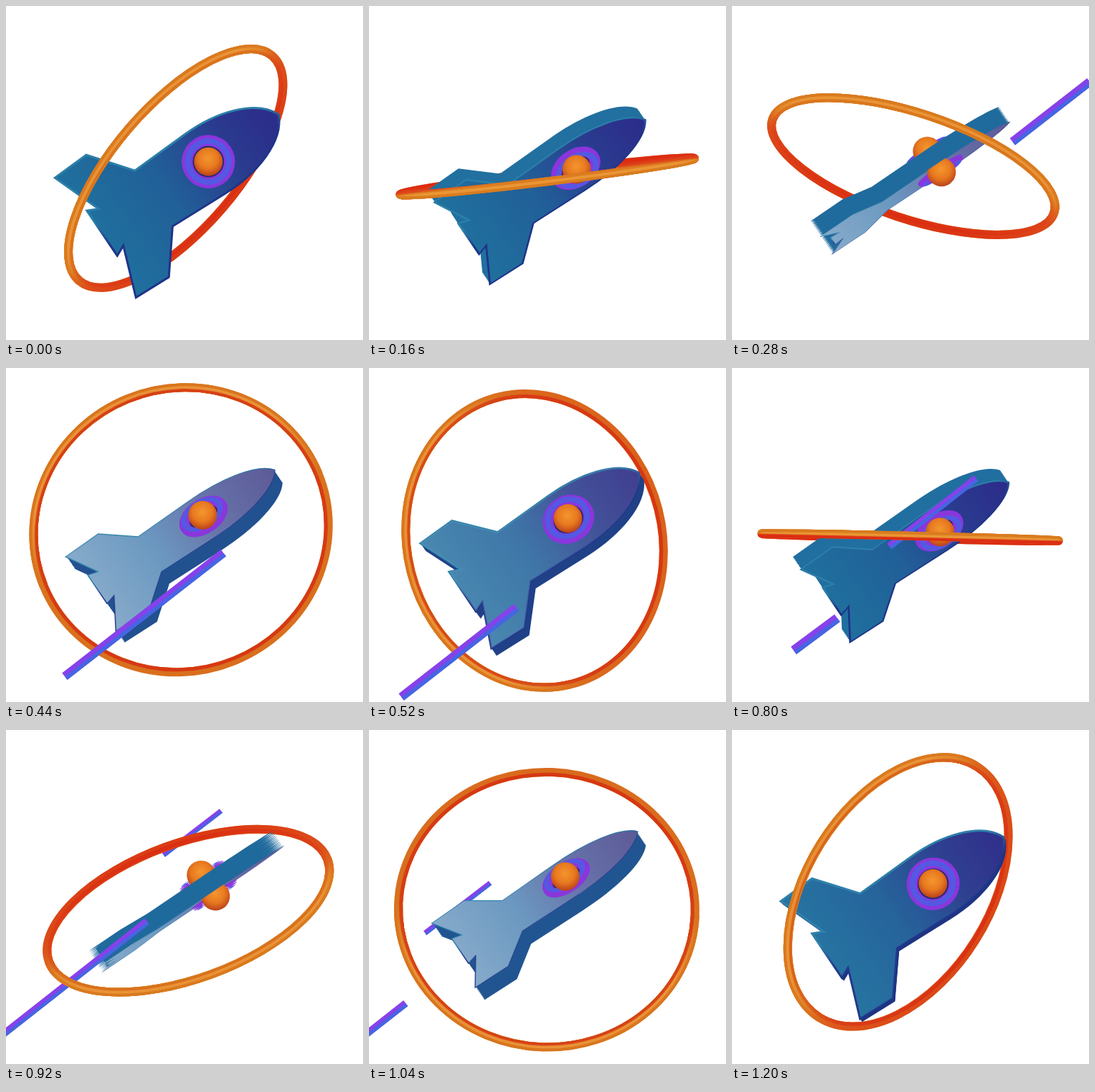
Animation, 498 px wide and 467 px high, one loop 1240 ms. Source, as an HTML page without scripts:

```html
<!DOCTYPE html>
<html lang="en">
<head>
<meta charset="utf-8">
<title>Spinning rocket</title>
<style>
@property --turn { syntax: '<angle>'; inherits: true; initial-value: 0deg; }
@property --roll { syntax: '<angle>'; inherits: true; initial-value: 0deg; }

html, body { margin: 0; width: 100%; height: 100%; overflow: hidden; background: #fff; }
svg { display: block; width: 498px; height: 467px; }

/* The ring tumbles about two axes; its matrix is the flat projection of both turns. */
.ring {
  --q: calc(var(--turn) + 58.7deg);
  --r: calc(var(--turn) + 36deg);
  --nx: calc(cos(var(--r)) * sin(var(--q)));
  --ny: calc(sin(var(--r)));
  --nz: calc(cos(var(--r)) * cos(var(--q)));
  animation: tumble 1240ms linear infinite;
  transform:
    translate(calc(248.5px - 41px * var(--nx) * var(--nz)), calc(237px - 41px * var(--ny) * var(--nz)))
    matrix(calc(cos(var(--q))), 0, calc(-1 * sin(var(--r)) * sin(var(--q))), calc(cos(var(--r))), 0, 0)
    rotate(atan2(calc(-1 * sin(var(--r)) * cos(var(--q))), calc(-1 * sin(var(--q)))));
  fill: none;
}
.ring path, .ring circle { vector-effect: non-scaling-stroke; }
.outer { stroke: #d9761f; stroke-width: 12px; }
.inner { stroke: #d63a14; stroke-width: 5px; }
.tint { stroke: url(#tube); stroke-width: 12px; opacity: calc(1 - var(--nz) * var(--nz)); }
.shine { stroke: url(#gloss); stroke-width: 4px; }
@keyframes tumble { to { --turn: 360deg; } }

/* Both sides of the rocket look alike, so half a turn repeats. */
.rocket { animation: roll 620ms -310ms linear infinite; }
@keyframes roll { from { --roll: -90deg; } to { --roll: 90deg; } }
.layer { transform: matrix(1, 0, 0, calc(cos(var(--roll))), 0, calc(sin(var(--roll)) * var(--w) * var(--side, 1))); }
.ball { transform: translateY(calc(sin(var(--roll)) * 18px * var(--side))); }
.visible { transform: translateY(calc(sin(var(--roll)) * (113px - 50px * cos(var(--roll))))); }
.edge { animation: edge 620ms -310ms linear infinite; }
.sheen { animation: sheen 620ms -310ms linear infinite; }
@keyframes edge {
  0%, 100% { fill: #1f6a9c; }
  22% { fill: #22508f; }
  49% { fill: #1d2f80; }
  50% { fill: #2577a5; }
}
@keyframes sheen {
  0%, 22%, 95%, 100% { opacity: 1; }
  40% { opacity: .1; }
  50%, 80% { opacity: 0; }
}

/* Beams: dash pattern is "0, tail, length, rest". */
.beam { fill: none; stroke: #8642ea; stroke-width: var(--size); animation: 1240ms linear infinite; }
.beam path + path { stroke: #4466e2; stroke-width: calc(var(--size) * .45); transform: translate(calc(var(--size) * .16), calc(var(--size) * .22)); }
.long { --size: 12px; animation-name: long; }
.low { --size: 13px; animation-name: low; }
.mid { --size: 10px; animation-name: mid; }
.far { --size: 7px; animation-name: far; }
@keyframes long {
  0%, 18% { stroke-dasharray: 0 0 0 999; }
  22.6% { stroke-dasharray: 0 0 136 999; }
  37.1% { stroke-dasharray: 0 279 298 999; }
  52.6%, 100% { stroke-dasharray: 0 577 0 999; }
}
@keyframes low {
  0%, 52.6% { stroke-dasharray: 0 0 0 999; }
  56.8% { stroke-dasharray: 0 0 120 999; }
  60.5% { stroke-dasharray: 0 78 158 999; }
  68.4%, 100% { stroke-dasharray: 0 236 0 999; }
}
@keyframes mid {
  0%, 59.4% { stroke-dasharray: 0 0 0 999; }
  64.5% { stroke-dasharray: 0 0 153 999; }
  74.8% { stroke-dasharray: 0 195 266 999; }
  88.7%, 100% { stroke-dasharray: 0 461 0 999; }
}
@keyframes far {
  0%, 71% { stroke-dasharray: 0 0 0 999; }
  75.3% { stroke-dasharray: 0 0 133 999; }
  80.3% { stroke-dasharray: 0 96 184 999; }
  90%, 100% { stroke-dasharray: 0 280 0 999; }
}
</style>
</head>
<body>
<svg viewBox="0 0 498 467">
  <defs>
    <linearGradient id="tube" gradientUnits="userSpaceOnUse" x1="-207" y1="0" x2="207" y2="0">
      <stop offset="0" stop-color="#dc2c12"/>
      <stop offset=".4" stop-color="#de451a"/>
      <stop offset=".62" stop-color="#dc7d20"/>
      <stop offset="1" stop-color="#d97c1e"/>
    </linearGradient>
    <linearGradient id="gloss" gradientUnits="userSpaceOnUse" x1="-207" y1="0" x2="207" y2="0">
      <stop offset=".5" stop-color="#f0a040" stop-opacity="0"/>
      <stop offset=".75" stop-color="#f0a040" stop-opacity=".7"/>
    </linearGradient>
    <linearGradient id="paint" gradientUnits="userSpaceOnUse" x1="-95" y1="0" x2="205" y2="0">
      <stop offset="0" stop-color="#1f709e"/>
      <stop offset=".4" stop-color="#215f98"/>
      <stop offset=".75" stop-color="#2a3a8e"/>
      <stop offset="1" stop-color="#2c2c8a"/>
    </linearGradient>
    <linearGradient id="rim" gradientUnits="userSpaceOnUse" x1="0" y1="-50" x2="0" y2="50">
      <stop offset=".3" stop-color="#2b7fa9"/>
      <stop offset=".7" stop-color="#1e3488"/>
    </linearGradient>
    <linearGradient id="pale" gradientUnits="userSpaceOnUse" x1="-95" y1="0" x2="205" y2="0">
      <stop offset="0" stop-color="#86aaca"/>
      <stop offset=".35" stop-color="#6b98c0"/>
      <stop offset=".65" stop-color="#6874aa"/>
      <stop offset="1" stop-color="#5c5b98"/>
    </linearGradient>
    <radialGradient id="orb" cx=".55" cy=".4" r=".62">
      <stop offset="0" stop-color="#f3962f"/>
      <stop offset=".55" stop-color="#e8791f"/>
      <stop offset="1" stop-color="#b8401c"/>
    </radialGradient>
    <path id="hull" d="M0-47L86-50C140-52 195-35 210 0C195 35 140 52 86 50L0 47L-44 103L-98 101L-72 31L-87 38V-38L-72-31L-98-101L-44-103Z"/>
    <g id="porthole">
      <circle class="layer" style="--w:14" r="24" fill="#232a72"/>
      <g fill="none" stroke="#8a36dc">
        <circle class="layer" style="--w:14" r="29.5" stroke-width="15"/>
        <circle class="layer" style="--w:16" r="29.5" stroke-width="15"/>
        <circle class="layer" style="--w:18" r="29.5" stroke-width="13"/>
        <circle class="layer" style="--w:20" r="28.5" stroke-width="8" stroke="#5458e2"/>
      </g>
      <circle class="ball" r="20" fill="url(#orb)"/>
    </g>
  </defs>

  <g class="beam far"><path d="M300 113L78 284"/><path d="M300 113L78 284"/></g>

  <g class="ring">
    <circle class="outer" r="207"/>
    <circle class="inner" r="203.5"/>
    <circle class="tint" r="207"/>
    <circle class="shine" r="207"/>
  </g>

  <g class="rocket">
    <g transform="translate(206 269) rotate(-34)">
      <clipPath id="facing"><rect class="visible" x="-100" y="-100" width="200" height="200"/></clipPath>
      <use href="#porthole" x="92" style="--side:-1"/>
      <g class="edge">
        <use href="#hull" class="layer" style="--w:-13"/>
        <use href="#hull" class="layer" style="--w:-11"/>
        <use href="#hull" class="layer" style="--w:-9"/>
        <use href="#hull" class="layer" style="--w:-7"/>
        <use href="#hull" class="layer" style="--w:-5"/>
        <use href="#hull" class="layer" style="--w:-3"/>
        <use href="#hull" class="layer" style="--w:-1"/>
        <use href="#hull" class="layer" style="--w:1"/>
        <use href="#hull" class="layer" style="--w:3"/>
        <use href="#hull" class="layer" style="--w:5"/>
        <use href="#hull" class="layer" style="--w:7"/>
        <use href="#hull" class="layer" style="--w:9"/>
        <use href="#hull" class="layer" style="--w:11"/>
      </g>
      <g class="layer" style="--w:13">
        <use href="#hull" fill="url(#paint)" stroke="url(#rim)" stroke-width="3"/>
        <use href="#hull" class="sheen" fill="url(#pale)"/>
      </g>
      <g transform="translate(92 0)">
        <g clip-path="url(#facing)"><use href="#porthole" style="--side:1"/></g>
      </g>
    </g>
  </g>

  <g class="beam mid"><path d="M342 153L-20 438"/><path d="M342 153L-20 438"/></g>

  <g class="ring">
    <path class="outer" d="M0-207A207 207 0 0 1 0 207"/>
    <path class="inner" d="M0-203.5A203.5 203.5 0 0 1 0 203.5"/>
    <path class="tint" d="M0-207A207 207 0 0 1 0 207"/>
    <path class="shine" d="M0-207A207 207 0 0 1 0 207"/>
  </g>

  <g class="beam low"><path d="M275 254L86 395"/><path d="M275 254L86 395"/></g>
  <g class="beam long"><path d="M500 105L45 460"/><path d="M500 105L45 460"/></g>
</svg>
</body>
</html>
```
